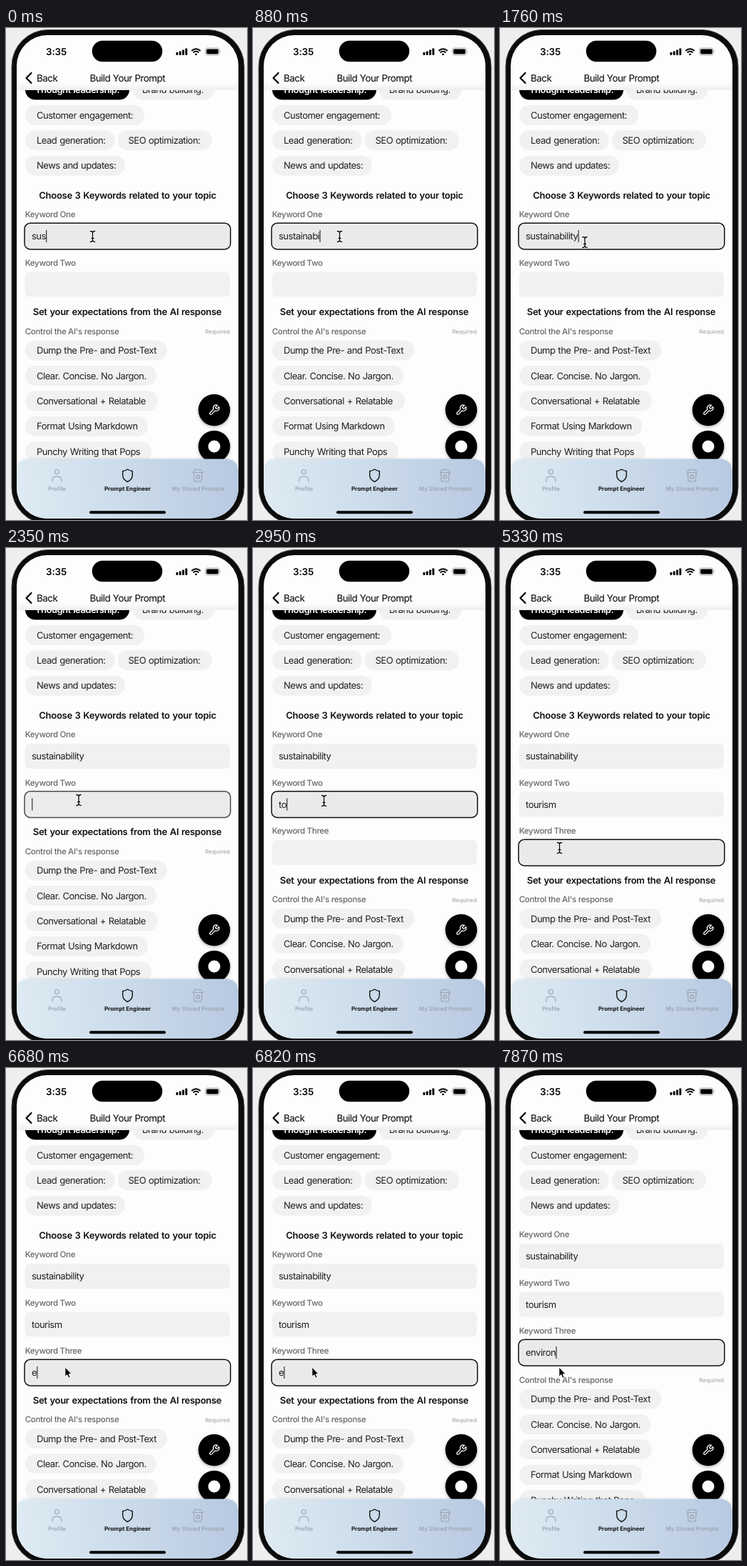
Recreate the animation shown at these times as an HTML page. Size 338 px wide and 689 px high, loop 8000 ms.

```html
<!DOCTYPE html>
<html lang="en">
<head>
<meta charset="utf-8">
<title>Build Your Prompt</title>
<style>
  html, body { margin: 0; width: 100%; height: 100%; overflow: hidden; background: #eeeeee; }
  svg { display: block; width: 338px; height: 689px; }
  text { font-family: Inter, "Liberation Sans", sans-serif; font-size: 13px; letter-spacing: -.5px; word-spacing: .8px; fill: #1f1f1f; white-space: pre; text-rendering: geometricPrecision; }
  .head { font-weight: 600; letter-spacing: -.28px; fill: #111; }
  .label { font-size: 11.5px; font-weight: 500; letter-spacing: -.3px; word-spacing: 0; fill: #666; }
  .nav { font-size: 13.4px; word-spacing: .3px; fill: #000; }
  .time { font-size: 13.4px; font-weight: 600; letter-spacing: -.1px; fill: #000; }
  .tiny { font-size: 8px; font-weight: 500; letter-spacing: .08px; fill: #a9a9a9; }
  .tab { font-size: 8px; font-weight: 600; letter-spacing: 0; word-spacing: 0; fill: #9aa5b1; }
  .tab.on { font-weight: 700; fill: #111; }
  .mid { text-anchor: middle; }
  .end { text-anchor: end; }
  .line { fill: none; stroke-linecap: round; stroke-linejoin: round; }
</style>
</head>
<body>
<svg id="stage" viewBox="0 0 338 689"></svg>
<script>
const LOOP = 8000, GAP = 67.5;
const stage = document.getElementById('stage');
const $ = id => document.getElementById(id);

const text = (x, y, str, cls = '', extra = '') =>
  `<text x="${x}" y="${y}" class="${cls}" ${extra}>${str}</text>`;

const chip = (x, mid, right, str, pad = 16, on = false) =>
  `<rect x="${x}" y="${mid - 14}" width="${right - x}" height="28" rx="14" fill="${on ? '#000' : '#f1f1f1'}"/>` +
  text(x + pad, mid + 4.7, str, '', on ? 'style="fill:#fff;font-weight:600"' : '');

const field = (name, i) => {
  const y = 291.5 + i * GAP;
  return `<g id="field${i}">${text(26.7, y - 26.2, 'Keyword ' + name, 'label')}
    <rect x="26.5" y="${y - 17.5}" width="287.5" height="35" rx="7" fill="#f1f1f1"/>
    <rect id="ring${i}" x="26" y="${y - 18.2}" width="288.8" height="36.6" rx="8" fill="#eaeaea" stroke="#111" stroke-width="1.5"/>
    ${text(36, y + 4.7, '', '', `id="word${i}"`)}</g>`;
};

const options = [['Dump the Pre- and Post-Text', 226], ['Clear. Concise. No Jargon.', 211],
  ['Conversational + Relatable', 213], ['Format Using Markdown', 199], ['Punchy Writing that Pops', 204]];

const fab = (y, icon) =>
  `<circle cx="292" cy="${y}" r="22.3" fill="#000" filter="url(#soft)"/>${icon}`;

const beam = (color, width) =>
  `<path d="M-3.2 -7.5Q0 -7.5 0 -5Q0 -7.5 3.2 -7.5M0 -5V5M-3.2 7.5Q0 7.5 0 5Q0 7.5 3.2 7.5M-1.5 2.5H1.5"
    stroke="${color}" stroke-width="${width}"/>`;

stage.innerHTML = `
<defs>
  <clipPath id="screen"><rect x="15" y="10" width="311" height="677" rx="43"/></clipPath>
  <clipPath id="page"><rect x="15" y="87" width="311" height="530"/></clipPath>
  <linearGradient id="bar" gradientUnits="userSpaceOnUse" x1="15" y1="660" x2="326" y2="630">
    <stop offset="0" stop-color="#deebf3"/><stop offset=".5" stop-color="#cbdbea"/><stop offset="1" stop-color="#b8c9e2"/>
  </linearGradient>
  <linearGradient id="veil" x1="0" y1="0" x2="0" y2="1">
    <stop offset="0" stop-color="#fdfdfd"/><stop offset="1" stop-color="#eeeeee"/>
  </linearGradient>
  <filter id="soft" x="-30%" y="-30%" width="160%" height="160%">
    <feDropShadow dx="0" dy="1.5" stdDeviation="2" flood-opacity=".3"/>
  </filter>
</defs>
<rect width="338" height="689" fill="#eeeeee"/>
<rect x="8" y="2.5" width="326" height="692" rx="51" fill="#0b0b0c" stroke="#4b4b4d"/>
<g clip-path="url(#screen)">
  <rect x="15" y="10" width="311" height="678" fill="#fdfdfd"/>
  <g clip-path="url(#page)">
    ${chip(27, 86.5, 173, 'Thought leadership:', 14, true)}
    ${chip(177, 86.5, 292, 'Brand building:', 14)}
    ${chip(27, 122, 194, 'Customer engagement:')}
    ${chip(27, 157.3, 153, 'Lead generation:')}
    ${chip(156.5, 157.3, 289, 'SEO optimization:', 15)}
    ${chip(27, 192.7, 167, 'News and updates:')}
    <g id="intro">${text(170.5, 239, 'Choose 3 Keywords related to your topic', 'head mid')}</g>
    <g id="fields">${['One', 'Two', 'Three'].map(field).join('')}
      <rect id="caret" width="1.1" height="17" fill="#222"/></g>
    <g id="rest">
      <g id="expect">${text(170, 402, 'Set your expectations from the AI response', 'head mid')}</g>
      ${text(26.7, 428.6, "Control the AI's response", 'label')}
      ${text(314, 428.4, 'Required', 'tiny end')}
      ${options.map(([str, right], i) => chip(27, 451.5 + i * 35.4, right, str)).join('')}
    </g>
    ${fab(535, `<path class="line" transform="translate(283.6 526.6) scale(.7)" stroke="#fff" stroke-width="1.8"
      d="M14.7 6.3a1 1 0 0 0 0 1.4l1.6 1.6a1 1 0 0 0 1.4 0l3.77-3.77a6 6 0 0 1-7.94 7.94l-6.91 6.91a2.12 2.12 0 0 1-3-3l6.91-6.91a6 6 0 0 1 7.94-7.94l-3.76 3.76z"/>`)}
    ${fab(586, '<circle cx="292" cy="586" r="8.5" fill="#fff"/>')}
  </g>

  <rect x="15" y="77" width="311" height="10" fill="url(#veil)"/>
  ${text(56, 37.8, '3:35', 'time')}
  <rect x="120.7" y="17.7" width="98.6" height="29.6" rx="14.8" fill="#000"/>
  ${[4, 5.5, 7.5, 9.5].map((h, i) =>
    `<rect x="${238.5 + i * 4.3}" y="${38 - h}" width="2.9" height="${h}" rx=".8"/>`).join('')}
  <g fill="none" stroke="#000" stroke-width="2">
    <path d="M260.3 32.1Q266.5 26.3 272.7 32.1"/><path d="M262.6 34.5Q266.5 31 270.4 34.5"/>
  </g>
  <path d="M264.5 36.4Q266.5 34.9 268.5 36.4L266.5 38.5Z"/>
  <rect x="279.5" y="28" width="20" height="10" rx="3" fill="none" stroke="#999" stroke-width=".8"/>
  <rect x="281" y="29.5" width="17" height="7" rx="1.8"/>
  <path d="M300.7 31.3q1.4 1.7 0 3.4z" fill="#999"/>
  <path class="line" d="M35.5 63L28.5 70L35.5 77" stroke="#000" stroke-width="2.2"/>
  ${text(43, 74.8, 'Back', 'nav')}
  ${text(170.3, 74.8, 'Build Your Prompt', 'nav mid')}

  <path d="M15 689V623Q15 603.5 34 603.5H307Q326 603.5 326 623V689Z" fill="url(#bar)" filter="url(#soft)"/>
  <g class="line" stroke="#9aa5b1" stroke-width="1.2">
    <circle cx="71.3" cy="621.5" r="3"/>
    <path d="M64.8 635V633.5Q64.8 627.8 71.3 627.8Q77.8 627.8 77.8 633.5V635"/>
    <path d="M262 622.5L265 618.5H273.5L276.5 622.5ZM263.3 622.5L264.3 635H274.2L275.2 622.5"/>
    <circle cx="269.3" cy="628.5" r="2.4"/>
    <path stroke="#111" stroke-width="1.4" d="M170.5 618Q174 620.3 177.3 620.5V626.5Q177 632.5 170.5 635.5Q164 632.5 163.7 626.5V620.5Q167 620.3 170.5 618Z"/>
  </g>
  ${text(71.5, 647.8, 'Profile', 'tab mid')}
  ${text(170.5, 647.8, 'Prompt Engineer', 'tab on mid')}
  ${text(269.5, 647.8, 'My Stored Prompts', 'tab mid')}
  <rect x="117" y="676.3" width="107" height="4" rx="2"/>
</g>
<g id="beam" class="line">${beam('#fff', 2.8)}${beam('#000', 1.3)}</g>
<path id="arrow" d="M0 0V13.3L3 10.6L5 15.2L7.3 14.2L5.3 9.7H9.4Z" fill="#000" stroke="#fff" stroke-linejoin="round"/>`;

// Every table row starts with the time in ms from which it holds.
const words = ['sustainability', 'tourism', 'environ'];
const keys = [
  [[0, 3], [140, 4], [290, 5], [730, 8], [880, 10], [1030, 11], [1180, 12], [1320, 13], [1470, 14]],
  [[0, 0], [2800, 1], [2950, 2], [3100, 3], [3250, 4], [3390, 5], [3540, 6], [3690, 7]],
  [[0, 0], [6680, 1], [6970, 2], [7270, 3], [7420, 4], [7570, 5], [7720, 6], [7870, 7]]
];
const focus = [[0, 0, 1], [2350, 1, .75], [2500, 1, 1], [4880, 2, .75], [5030, 2, 1]];
const blink = [[0, 1], [5330, 0], [5930, 1], [6380, 0], [6680, 1]];
// field count, shift of the fields, shift of the part below, headings shown
const layout = [[0, 2, 0, 0, 1], [2950, 3, 0, GAP, 1], [6830, 3, -28, 12, 0]];
const pointer = [
  [0, 121.5, 292, 'beam'], [1760, 119, 300, 'beam'], [1910, 112, 319, 'arrow'], [2060, 105, 337, 'arrow'],
  [2200, 103, 351, 'beam'], [2350, 102, 353, 'beam'], [2500, 99.5, 354, 'beam'],
  [4290, 97, 360, 'beam'], [4430, 94, 380, 'arrow'], [4580, 89, 400, 'arrow'], [4730, 85, 415, 'beam'],
  [4880, 83.5, 420, 'beam'], [6680, 82.8, 419, 'arrow']
];

const at = (table, t) => table.findLast(row => row[0] <= t).slice(1);
const show = (id, on) => { $(id).style.display = on ? '' : 'none'; };
const move = (id, x, y) => $(id).setAttribute('transform', `translate(${x} ${y})`);

function draw(t) {
  const [count, fieldsY, restY, heads] = at(layout, t);
  show('intro', heads);
  show('expect', heads);
  show('field2', count > 2);
  move('fields', 0, fieldsY);
  move('rest', 0, restY);

  const [active, strength] = at(focus, t);
  words.forEach((word, i) => {
    $('word' + i).textContent = word.slice(0, at(keys[i], t)[0]);
    $('ring' + i).setAttribute('opacity', i === active ? strength : 0);
  });

  const typed = $('word' + active);
  const width = typed.textContent ? typed.getComputedTextLength() : 0;
  const caret = $('caret');
  caret.setAttribute('x', 36.2 + width);
  caret.setAttribute('y', 283 + active * GAP);
  caret.setAttribute('opacity', at(blink, t)[0]);

  const [x, y, kind] = at(pointer, t);
  for (const id of ['beam', 'arrow']) show(id, id === kind);
  move(kind, x, y);
}

const start = performance.now();
function tick() {
  draw((performance.now() - start) % LOOP);
  requestAnimationFrame(tick);
}
tick();
</script>
</body>
</html>
```
